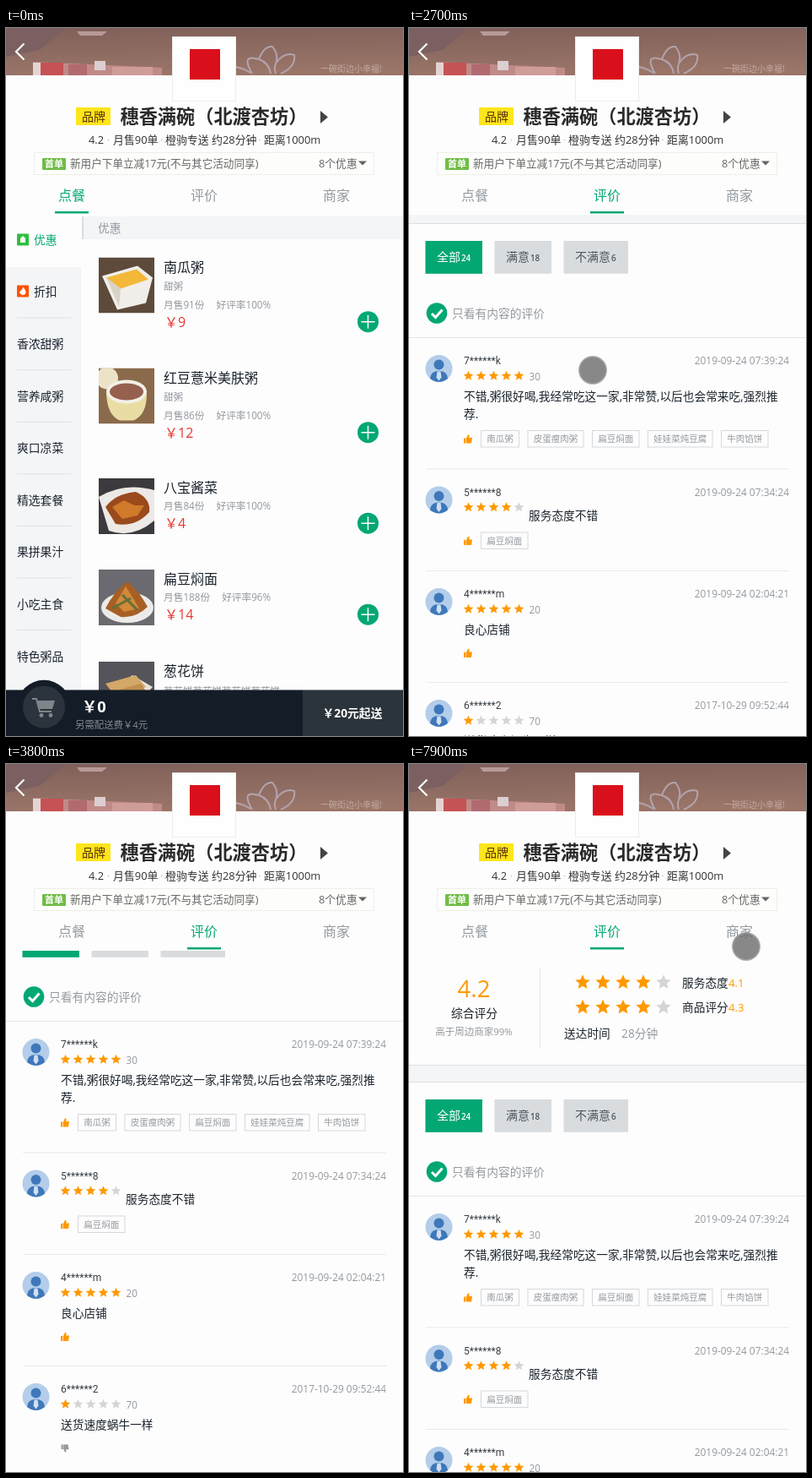
An HTML page for the animation above (8 s loop, 471 by 838 pixels).

```html
<!DOCTYPE html>
<html lang="zh">
<head>
<meta charset="utf-8">
<title>外卖店铺</title>
<style>
html, body { margin: 0; width: 100%; height: 100%; overflow: hidden; background: #fdfdfd; }
svg { display: block; width: 100vw; height: 100vh; }
text { font-family: "Open Sans", "Noto Sans CJK SC", "Noto Sans CJK", sans-serif; white-space: pre; }
.name { font-family: Roboto, sans-serif; }
.anim { animation-duration: 8s; animation-timing-function: step-end; animation-iteration-count: infinite; }
</style>
</head>
<body>
<svg id="stage" viewBox="0 0 471 838"></svg>
<script>
const GREEN = '#02a774', ORANGE = '#ff9900', GREY = '#93999f', INK = '#1a232c', PALE = '#f3f5f7';

// Shape helpers; text takes its vertical centre.
const text = (x, cy, size, str, fill = INK, extra = '') =>
  `<text x="${x}" y="${(cy + size * .36).toFixed(2)}" font-size="${size}" fill="${fill}" ${extra}>${str}</text>`;
const rect = (x, y, w, h, fill, extra = '') =>
  `<rect x="${x}" y="${y}" width="${w}" height="${h}" fill="${fill}" ${extra}/>`;
const circle = (x, y, r, fill, extra = '') =>
  `<circle cx="${x}" cy="${y}" r="${r}" fill="${fill}" ${extra}/>`;
const path = (d, fill, extra = '') => `<path d="${d}" fill="${fill}" ${extra}/>`;
const stroke = (d, color, width = 1, extra = '') =>
  path(d, 'none', `stroke="${color}" stroke-width="${width}" ${extra}`);
const group = (body, attrs = '') => `<g ${attrs}>${body}</g>`;
const anim = (name, body) => group(body, `class="anim" style="animation-name:${name}"`);
const MID = 'text-anchor="middle"', BOLD = 'font-weight="700"';

function star(cx, cy, r, fill) {
  const pts = [...Array(10).keys()].map(i => {
    const a = (i / 5 - .5) * Math.PI, q = i % 2 ? r * .46 : r;
    return (cx + q * Math.cos(a)).toFixed(1) + ',' + (cy + q * Math.sin(a)).toFixed(1);
  });
  return `<polygon points="${pts.join(' ')}" fill="${fill}"/>`;
}
const stars = (x, y, gap, r, score) =>
  [0, 1, 2, 3, 4].map(i => star(x + gap * i, y, r, i < score ? ORANGE : '#d3d5d7')).join('');

function header() {
  const photo = rect(0, 0, 471, 56, 'url(#wall)') +
    path('M0 0H70L40 26 0 34Z', '#7c6061') + path('M32 40L185 47V56H32Z', '#c08a88') +
    rect(32, 41, 36, 15, '#c55254') + rect(32, 41, 9, 15, '#e5d3d4') +
    rect(74, 43, 22, 13, '#b16a70') + rect(105, 39, 13, 11, '#dccfd0') + rect(126, 46, 48, 10, '#cf9d98') +
    path('M84 4h36l-6 5H88Z', '#b79a98') +
    stroke('M246 54q20-16 44-1M292 54q-14-24 8-17q6-16 16-15q8 10 4 20q10-14 22-10q2 14-16 22M300 37q12 4 14 17M320 42q-2 6 0 12',
      '#b3a3ad', 2) + text(373, 48, 10, '一碗街边小幸福!', '#c4aca2');
  const logo = rect(197.5, 10.5, 75, 76, '#fefefe', 'stroke="#ececec"') + rect(218, 25, 36, 36, '#d9101c');
  const info = [[98, '4.2'], [127, '月售90单'], [189, '橙驹专送'], [244, '约28分钟'], [306, '距离1000m']]
    .map(([x, s]) => text(x, 132, 12.9, s, '#333')).join('') +
    [121.5, 184.5, 301].map(x => circle(x, 132.5, .8, '#bbb')).join('');
  const promo = rect(33.5, 147.5, 403, 26, '#fdfdfb', 'stroke="#e6e6e0" stroke-dasharray="2 1"') +
    rect(43, 154, 28, 14, '#70bc46', 'rx="1"') + text(57, 161, 11, '首单', '#fff', MID + ' ' + BOLD) +
    text(76, 160.5, 12.6, '新用户下单立减17元(不与其它活动同享)', '#666') +
    text(371, 160.5, 12.8, '8个优惠', '#666') + path('M418 157.5h10l-5 5Z', '#666');
  return photo + stroke('M21.5 18.5L12 28l9.5 9.5', '#fff', 2.2) + logo +
    rect(83, 94, 41, 21, '#ffe51a', 'rx="1"') + text(90, 104.5, 14, '品牌', '#5a2d0c') +
    text(135.5, 105.5, 22.2, '穗香满碗（北渡杏坊）', '#2a2a2a', BOLD) +
    path('M373 98l9 7.5-9 7.5Z', '#444') + info + promo;
}

function tabs() {
  const label = (x, s, c) => text(x, 198.5, 16, s, c, MID);
  const on = (x, s) => label(x, s, GREEN) + rect(x - 20, 217, 40, 2.5, GREEN);
  return label(392, '商家', GREY) +
    anim('order', on(78, '点餐') + label(235, '评价', GREY)) +
    anim('rating', on(235, '评价') + label(78, '点餐', GREY));
}

// Each dish photo: backdrop, crockery and food as flat shapes inside 66 x 66.
const dishes = [
  ['#5d4a3a', path('M4 22L46 10 64 24 56 54 22 62Z', '#f1eee9') + path('M9 24L45 14 59 26 26 37Z', '#f3b838') + path('M9 24L26 37 24 58Z', '#d8d2c8')],
  ['#8a6a4a', circle(10, 12, 13, '#ece2c8') + path('M9 30h48q0 26-16 32H25Q10 56 9 30Z', '#e9dda4') + `<ellipse cx="33" cy="28" rx="24" ry="14" fill="#f3efe8"/><ellipse cx="33" cy="28" rx="20" ry="10" fill="#96604f"/>`],
  ['#3c3a3e', path('M0 22Q30 4 66 14V50Q40 72 12 62Z', '#ece9e6') + path('M8 34Q20 18 44 16 62 24 60 40 44 58 20 54Z', '#9a4a1c') + path('M16 34l14-8 12 6 12 0-8 12-18 4Z', '#d07a2a')],
  ['#6a6a70', `<ellipse cx="34" cy="45" rx="31" ry="18" fill="#ecebea"/>` + path('M8 46Q18 26 34 14 48 26 58 44 44 58 26 56Z', '#a85f24') + path('M20 40L32 20 42 36 48 46 30 50Z', '#d4883a') + stroke('M16 46l22-12M28 30l18 18', '#64703a', 3)],
  ['#55545a', path('M4 42L40 16 64 30 30 66H6Z', '#e6e2dc') + path('M8 26L44 16 56 30 22 44Z', '#d3a868') + path('M14 36L50 26 58 38 24 52Z', '#c08f50')]
];

function food(i, y, title, desc, sold, rate, price) {
  const sy = y + (desc ? 56 : 33), py = sy + 20.5;
  return `<svg x="110" y="${y}" width="66" height="66">${rect(0, 0, 66, 66, dishes[i][0]) + dishes[i][1]}</svg>` +
    text(187, y + 11.5, 16, title) + (desc ? text(187, y + 34.5, 11.5, desc, GREY) : '') +
    text(187, sy, 11.7, `月售${sold}份<tspan dx="14">好评率${rate}%</tspan>`, GREY) +
    text(188, py, 16, '￥' + price, '#e8372f') + circle(429.5, py - .3, 12.5, GREEN) +
    stroke(`M421.5 ${py - .3}h16M429.5 ${py - 8.3}v16`, '#fff', 1.4);
}

function order() {
  const plain = ['香浓甜粥', '营养咸粥', '爽口凉菜', '精选套餐', '果拼果汁', '小吃主食', '特色粥品'];
  const side = rect(0, 283, 89, 501, PALE) +
    rect(13, 243.5, 14, 14, '#2fbf3f', 'rx="1"') + path('M17 254v-5l3-3 3 3v5Z', '#fff') + text(33, 251, 13.8, '优惠', GREEN) +
    rect(13, 304.5, 14, 14, '#ff5000', 'rx="1"') + path('M20 306.5q5 5 3 8-3 3-6 0-2-2 1-4 1 0 2-4Z', '#fff') + text(33, 312, 13.8, '折扣') +
    plain.map((s, i) => {
      const y = 374 + i * 61.6;
      return text(13, y, 13.8, s) + rect(13, y - 31.5, 64, 1, '#dfe2e5');
    }).join('');
  const bar = rect(0, 783.5, 352, 55, '#141d27') + rect(352, 783.5, 119, 55, '#2b333b') +
    circle(45, 803.7, 32, '#141d27') + circle(45, 803.7, 25, '#2b343c') +
    stroke('M31 794h5l4 15h14', '#80858a', 2) + path('M37 796h21l-3 10H40Z', '#80858a') +
    circle(42, 813.5, 2.4, '#80858a') + circle(53, 813.5, 2.4, '#80858a') +
    text(90, 803, 18.3, '￥0', '#fff', BOLD) + text(82, 825, 11.4, '另需配送费￥4元', '#858a90') +
    text(411, 811, 13.8, '￥20元起送', '#fff', MID + ' ' + BOLD);
  return side + rect(90, 223, 381, 27, PALE) + rect(90, 223, 2, 27, '#d9dde1') + text(109, 237, 13.8, '优惠', GREY) +
    food(0, 271.5, '南瓜粥', '甜粥', 91, 100, 9) +
    food(1, 402.5, '红豆薏米美肤粥', '甜粥', 86, 100, 12) +
    food(2, 533, '八宝酱菜', '', 84, 100, 4) +
    food(3, 641, '扁豆焖面', '', 188, 96, 14) +
    food(4, 750, '葱花饼', '葱花饼葱花饼葱花饼葱花饼', 124, 85, 10) + bar;
}

function thumb(y, up) {
  const d = 'M-5 -1h2.4v6H-5ZM-2 -1L0 -5.2q2 0 1.6 2l-.4 1.8H5L4 5H-2Z';
  return path(d, up ? ORANGE : GREY, `transform="translate(70 ${y}) scale(${up ? '1' : '.9 -.9'})"`);
}

function tagRow(y, tags) {
  let x = 85.5;
  return tags.map(s => {
    const w = s.length * 10.5 + 14, left = x;
    x += w + 10;
    return rect(left, y - 10, w - .5, 19.5, 'none', 'stroke="#d5d8db"') + text(left + 6.8, y, 10.5, s, GREY);
  }).join('');
}

// lag is the delivery time; without it the comment sits beside the stars.
function review(y, { name, date, score, lag, lines, tags = [], up = true }) {
  const ty = y + (lag ? 42 : 28), end = ty + (lines.length - 1) * 21, by = end + (tags.length ? 29.5 : 28);
  const face = group(circle(0, 0, 16, '#b3cdea') + circle(0, -4.5, 6, '#3f78ba') +
    path('M-10.5 12Q-10 3 0 3T10.5 12Q0 20 -10.5 12Z', '#3f78ba') + path('M-2 3.5h4l1 7-3 4-3-4Z', '#cfe0f2'),
    `transform="translate(35.5 ${y + 9})"`);
  return face + text(65, y, 12, name, '#363d44', 'class="name"') +
    text(451, y, 11.9, date, GREY, 'text-anchor="end"') +
    stars(70.5, y + 17.8, 15, 6.1, score) + (lag ? text(142.5, y + 19, 11.7, lag, GREY) : '') +
    lines.map((s, i) => text(lag ? 65 : 142, ty + i * 21, 13.7, s)).join('') +
    thumb(by, up) + tagRow(by, tags) + rect(20, end + (tags.length ? 64.5 : 62), 431, 1, '#e8eaec');
}

function rating() {
  const slow = { name: '6******2', date: '2017-10-29 09:52:44', score: 1, lag: 70, lines: ['送货速度蜗牛一样'], up: false };
  const all = review(539, { name: '7******k', date: '2019-09-24 07:39:24', score: 5, lag: 30,
      lines: ['不错,粥很好喝,我经常吃这一家,非常赞,以后也会常来吃,强烈推', '荐.'],
      tags: ['南瓜粥', '皮蛋瘦肉粥', '扁豆焖面', '娃娃菜炖豆腐', '牛肉馅饼'] }) +
    review(694.5, { name: '5******8', date: '2019-09-24 07:34:24', score: 4, lines: ['服务态度不错'], tags: ['扁豆焖面'] }) +
    review(815, { name: '4******m', date: '2019-09-24 02:04:21', score: 5, lag: 20, lines: ['良心店铺'] }) +
    review(947, slow);
  const bad = review(539, slow) +
    review(672, { name: 't******w', date: '2017-07-15 20:32:44', score: 3, lines: ['发票开的不对'], up: false });
  const button = (x, w, s, n, name) => {
    const face = (bg, fg) => rect(x, 397, w, 38.8, bg) + text(x + 13.5, 416, 14, s, fg) +
      text(x + 14.5 + s.length * 14, 417, 9.8, n, fg, 'font-weight="600"');
    return face('#d9dcdf', '#4d555d') + anim(name, face(GREEN, '#fff'));
  };
  const score = text(77, 266, 27.5, '4.2', ORANGE, MID) + text(77.5, 295, 13.8, '综合评分', INK, MID) +
    text(77, 317, 11.5, '高于周边商家99%', GREY, MID) + rect(155, 242, 1, 94, '#e4e6e8') +
    [['服务态度', '4.1', 259], ['商品评分', '4.3', 288.5]].map(([s, n, y]) =>
      stars(206, y - .5, 24, 9.2, 4) + text(324, y, 13.7, s) + text(379, y, 13.2, n, ORANGE)).join('') +
    text(184, 319, 13.7, '送达时间') + text(252, 319, 13.8, '28分钟', GREY);
  return anim('scroll', score + rect(-1, 356.5, 473, 20, PALE, 'stroke="#dcdfe2"') +
    button(19.5, 67.5, '全部', 24, 'all') + button(101.5, 67.5, '满意', 18, 'good') + button(183.5, 76.5, '不满意', 6, 'bad') +
    circle(33, 482.5, 12.3, GREEN) + stroke('M27 483l4.5 4.5 8-9', '#fff', 3) +
    text(51, 483.5, 13.75, '只看有内容的评价', GREY) + rect(0, 511, 471, 1, '#e3e6e8') +
    anim('fullList', all) + anim('bad', bad));
}

// Stepped keyframes from rows of [ms, ...values].
const LOOP = 8000;
const steps = (name, rows, css) =>
  `@keyframes ${name}{${rows.map(([ms, ...v]) => `${ms / LOOP * 100}%{${css(...v)}}`).join('')}100%{${css(...rows.at(-1).slice(1))}}}`;
const show = (name, ...rows) => steps(name, rows, o => `opacity:${o}`);

const sheet = document.createElement('style');
sheet.textContent =
  show('order', [0, 1], [1100, 0]) +
  show('rating', [0, 0], [1100, 1]) +
  show('all', [0, 1], [4100, 0], [6900, 1]) +
  show('good', [0, 0], [4100, 1], [5600, 0]) +
  show('bad', [0, 0], [5600, 1], [6900, 0]) +
  show('fullList', [0, 1], [5600, 0], [6900, 1]) +
  steps('scroll', [[0, 0], [2400, 10], [2500, 60], [2600, 105], [2700, 145], [2800, 178], [2900, 200], [3000, 213],
    [3100, 222], [3200, 227], [3300, 230], [3400, 232], [3500, 231], [3600, 228], [3700, 220], [3800, 207],
    [3900, 73], [4100, 72], [5600, 0]], y => `transform:translateY(${-y}px)`) +
  steps('pointer', [[0], [500, 379, 178], [600, 306, 182], [700, 262, 187], [800, 244, 194], [900, 240, 196], [1700],
    [1800, 255, 257], [1900, 248, 300], [2000, 230, 440], [2100, 222, 525], [2200, 222, 566],
    [2400, 222, 540], [2500, 221, 490], [2600, 219, 445], [2700, 218, 405], [2800],
    [3900, 136, 348], [4600], [4800, 36, 340], [4900, 100, 342], [5000, 180, 345], [5100, 235, 347], [5200, 248, 347],
    [6200], [6600, 47, 422], [7300], [7400, 110, 400], [7500, 190, 366], [7600, 255, 335], [7700, 310, 283],
    [7800, 352, 234], [7900, 400, 216]],
    (x, y) => x ? `opacity:1;transform:translate(${x}px,${y}px)` : 'opacity:0');
document.head.append(sheet);

document.getElementById('stage').innerHTML =
  `<defs><linearGradient id="wall" x2=".15" y2="1"><stop offset="0" stop-color="#80605a"/>
  <stop offset="1" stop-color="#9a7568"/></linearGradient>
  <clipPath id="view"><rect y="221" width="471" height="617"/></clipPath></defs>` +
  rect(0, 0, 471, 838, '#fdfdfd') + header() + tabs() +
  anim('order', order()) + anim('rating', group(rating(), 'clip-path="url(#view)"')) +
  anim('pointer', circle(0, 0, 16, '#6e6e6e', 'fill-opacity=".82" stroke="#9a9a9a" stroke-width="2" stroke-opacity=".75"'));
</script>
</body>
</html>
```
